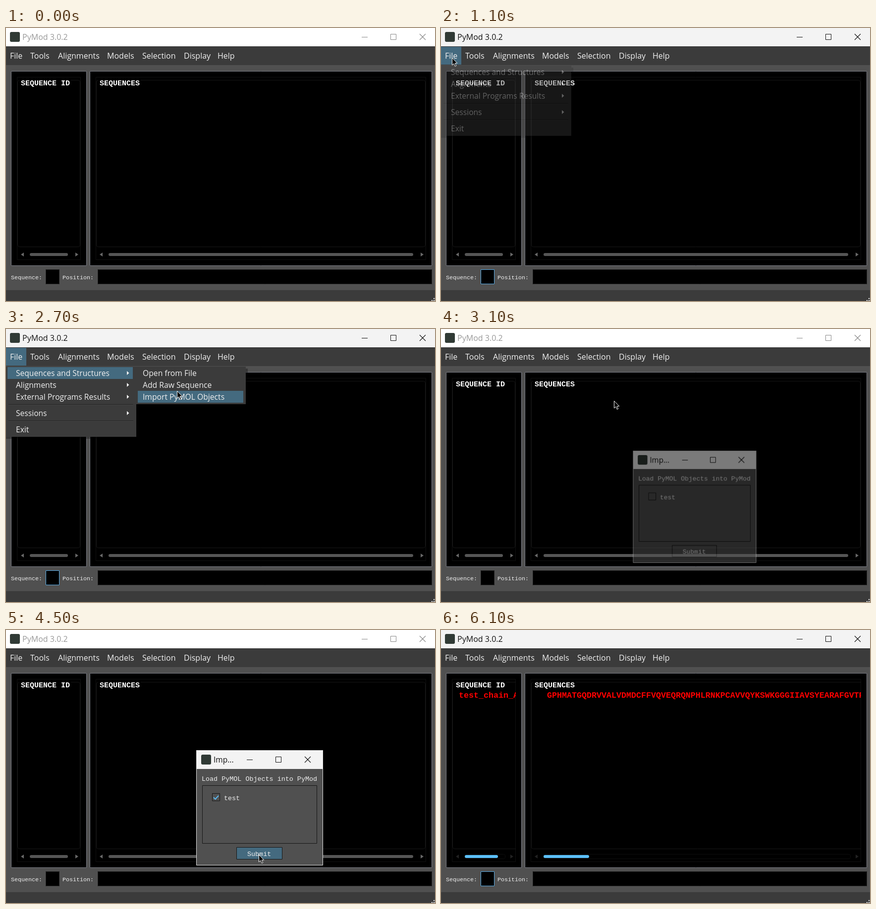
An HTML page with a canvas for the animation above (6700 ms loop, 866 by 552 pixels).

```html
<!DOCTYPE html>
<html lang="en">
<head>
<meta charset="utf-8">
<title>PyMod</title>
<style>
html, body { margin: 0; width: 100%; height: 100%; overflow: hidden; background: #505050; }
canvas { display: block; }
</style>
</head>
<body>
<canvas id="stage" width="866" height="552"></canvas>
<script>
const W = 866, H = 552, LOOP = 6700, STEP = 100;
const screen2d = document.getElementById('stage').getContext('2d');
const layer = document.createElement('canvas');
layer.width = W;
layer.height = H;
const layer2d = layer.getContext('2d');
let ctx = screen2d;

const UI = '"Open Sans", "Noto Sans", sans-serif';
const MONO = '"Liberation Mono", "Courier New", monospace';
const BG = '#505050', BAR = '#3b3b3b', TEAL = '#446a7f', BLUE = '#5cc0fa', TEXT = '#f0f0f0';

const CHAIN = 'GPHMATGQDRVVALVDMDCFFVQVEQRQNPHLRNKPCAVVQYKSWKGGGIIAVSYEARAFGVTR';

const BAR_ITEMS = [['File', 8], ['Tools', 49], ['Alignments', 105], ['Models', 204],
  ['Selection', 275], ['Display', 359], ['Help', 427]];
const FILE_ITEMS = [['Sequences and Structures', 89, true], ['Alignments', 113, true],
  ['External Programs Results', 137, true], ['Sessions', 170, true], ['Exit', 203, false]];
const SUB_ITEMS = [['Open from File', 89], ['Add Raw Sequence', 113], ['Import PyMOL Objects', 137]];

// Pointer stops: time, x, y, easing of the leg that ends there
const smooth = p => (1 - Math.cos(Math.PI * p)) / 2;
const easeOut = p => 1 - (1 - p) ** 2;
const easeIn = p => p ** 1.6;
const linear = p => p;
const PATH = [
  [100, 844, 62, linear], [700, 34, 62, easeOut], [800, 22, 60, linear],
  [1300, 22, 60, linear], [2000, 169, 83, smooth], [2700, 345, 125, smooth],
  [2900, 345, 135, easeOut], [3000, 345, 135, linear], [3700, 423, 338, smooth],
  [3800, 423, 338, linear], [4400, 510, 448, smooth], [4500, 510, 454, linear],
  [5500, 510, 454, linear], [6000, 797, 265, easeIn]
];

function pointerAt(t) {
  if (t < 100 || t > 6000) return null;
  const i = Math.max(1, PATH.findIndex(stop => stop[0] >= t));
  const [t0, x0, y0] = PATH[i - 1], [t1, x1, y1, ease] = PATH[i];
  const p = ease((t - t0) / (t1 - t0));
  return { x: Math.round(x0 + (x1 - x0) * p), y: Math.round(y0 + (y1 - y0) * p) };
}

function rect(x, y, w, h, color) {
  ctx.fillStyle = color;
  ctx.fillRect(x, y, w, h);
}

function frame(x, y, w, h, color, radius = 0) {
  ctx.strokeStyle = color;
  ctx.lineWidth = 1;
  ctx.beginPath();
  ctx.roundRect(x + 0.5, y + 0.5, w - 1, h - 1, radius);
  ctx.stroke();
}

function pill(x, y, w, h, color, radius = h / 2) {
  ctx.fillStyle = color;
  ctx.beginPath();
  ctx.roundRect(x, y, w, h, radius);
  ctx.fill();
}

function text(str, x, y, font, color) {
  ctx.font = font;
  ctx.fillStyle = color;
  ctx.fillText(str, x, y);
}

function triangle(x, y, w, h, color) {
  ctx.fillStyle = color;
  ctx.beginPath();
  ctx.moveTo(x, y - h);
  ctx.lineTo(x + w, y);
  ctx.lineTo(x, y + h);
  ctx.fill();
}

function polyline(points, color, width) {
  ctx.strokeStyle = color;
  ctx.lineWidth = width;
  ctx.beginPath();
  points.forEach(([x, y]) => ctx.lineTo(x, y));
  ctx.stroke();
}

// Draws a group on its own layer so it fades and scales as one piece
function faded(alpha, scale, cx, cy, draw) {
  layer2d.clearRect(0, 0, W, H);
  ctx = layer2d;
  draw();
  ctx = screen2d;
  ctx.save();
  ctx.globalAlpha = alpha;
  ctx.translate(cx, cy);
  ctx.scale(scale, scale);
  ctx.drawImage(layer, -cx, -cy);
  ctx.restore();
}

function windowButtons(xs, y, color) {
  const [min, max, close] = xs;
  rect(min, y, 12, 1, color);
  frame(max, y - 6, 12, 12, color);
  polyline([[close, y - 6], [close + 12, y + 6]], color, 1.1);
  polyline([[close, y + 6], [close + 12, y - 6]], color, 1.1);
}

function appIcon(x, y) {
  pill(x, y, 20, 20, '#303a35', 3);
}

function scrollBar(left, right, handleEnd, loaded) {
  const arrow = loaded ? '#222' : '#686868';
  if (loaded) frame(left + 15, 453, right - left - 28, 10, '#0e0e0e', 3);
  triangle(left + 3, 458, -6, 4, arrow);
  triangle(right - 3, 458, 6, 4, arrow);
  pill(left + 15, 455, handleEnd - left - 15, 6, loaded ? BLUE : '#555');
}

function panel(x, w, title, loaded, handleEnd, drawRow) {
  rect(x, 87, w, 394, '#000');
  frame(x, 87, w, 394, '#7d7f88');
  frame(x + 12, 99, w - 24, 370, '#111');
  ctx.save();
  ctx.beginPath();
  ctx.rect(x + 12, 99, w - 24, 370);
  ctx.clip();
  frame(x + 13, 105, loaded ? w : w - 26, 338, '#171717', 4);
  rect(x + 17, 102, title.length * 9 + 5, 14, '#000');
  text(title, x + 20, 116, `bold 15px ${MONO}`, '#fff');
  if (loaded) drawRow();
  ctx.restore();
  scrollBar(x + 23, x + w - 23 + 3, handleEnd, loaded);
}

function mainWindow(active, loaded, fileOpen) {
  rect(0, 0, W, H, BG);
  rect(0, 0, W, 37, active ? '#f3f3f3' : '#fff');
  appIcon(8, 8);
  text('PyMod 3.0.2', 33, 24, `16px ${UI}`, active ? '#111' : '#999');
  windowButtons([718, 776, 835], 18, active ? '#111' : '#888');

  rect(0, 37, W, 38, BAR);
  if (fileOpen) rect(0, 38, 41, 36, TEAL);
  for (const [label, x] of BAR_ITEMS) text(label, x, 62, `16px ${UI}`, TEXT);

  const redRow = `bold 16.67px ${MONO}`;
  panel(10, 153, 'SEQUENCE ID', loaded, loaded ? 115 : 125,
    () => text('test_chain_A', 36, 137, redRow, '#f00'));
  panel(169, 691, 'SEQUENCES', loaded, loaded ? 299 : 822,
    () => text(CHAIN, 214, 137, redRow, '#f00'));

  text('Sequence:', 10, 508, `11.67px ${MONO}`, TEXT);
  text('Position:', 114, 508, `11.67px ${MONO}`, TEXT);
  rect(80, 488, 28, 30, '#000');
  frame(80, 488, 28, 30, active ? '#5cb0ea' : '#222');
  rect(185, 488, 675, 30, '#000');
  frame(185, 488, 675, 30, '#222');

  rect(0, 530, W, 22, BAR);
  for (const [x, y] of [[863, 546], [859, 550], [863, 550]]) rect(x, y, 2, 2, '#eee');
}

function menuBox(x, w, h) {
  rect(x, 80, w + 4, h, 'rgba(0,0,0,.3)');
  rect(x, 76, w, h, BAR);
}

function fileMenu(rowLit) {
  menuBox(0, 263, 142);
  if (rowLit) rect(3, 77, 253, 24, TEAL);
  for (const y of [152, 185]) {
    rect(5, y, 252, 1, '#232323');
    rect(5, y + 1, 252, 1, '#444');
  }
  for (const [label, y, hasSub] of FILE_ITEMS) {
    text(label, 20, y + 6, `15.6px ${UI}`, TEXT);
    if (hasSub) triangle(244, y, 4.5, 4, TEXT);
  }
}

function subMenu(pointer) {
  menuBox(263, 221, 76);
  const row = pointer.x > 263 ? Math.floor((pointer.y - 77) / 24) : -1;
  if (row >= 0) rect(266, 77 + row * 24, 213, 24, TEAL);
  for (const [label, y] of SUB_ITEMS) text(label, 276, y + 6, `15.7px ${UI}`, TEXT);
}

function dialog(checked, button) {
  rect(384, 243, 256, 233, BG);
  rect(384, 243, 256, 38, '#f3f3f3');
  frame(384, 243, 256, 233, '#e4e4e4');
  appIcon(394, 252);
  text('Imp...', 419, 268, `15.5px ${UI}`, '#111');
  windowButtons([486, 544, 603], 262, '#111');

  const mono = `13.4px ${MONO}`;
  text('Load PyMOL Objects into PyMod', 395, 305, mono, TEXT);
  frame(396, 314, 232, 118, '#161616');
  frame(416, 330, 16, 16, '#161616');
  if (checked) polyline([[419, 338.5], [422.5, 342], [429, 335]], '#5cb8ee', 2);
  text('test', 440, 344, mono, TEXT);
  rect(465, 439, 93, 25, button);
  frame(465, 439, 93, 25, '#161616');
  text('Submit', 487, 457, mono, TEXT);
}

function drawPointer({ x, y }) {
  const outline = [[0, 0], [0, 14.5], [3.4, 11.5], [5.8, 17], [8.2, 16], [5.9, 10.6], [10.3, 10.6]];
  ctx.beginPath();
  outline.forEach(([dx, dy]) => ctx.lineTo(x + dx + 0.5, y + dy + 0.5));
  ctx.closePath();
  ctx.fillStyle = '#000';
  ctx.fill();
  ctx.strokeStyle = '#fff';
  ctx.lineWidth = 1;
  ctx.stroke();
}

function render(t) {
  const pointer = pointerAt(t);
  const menuOpen = t >= 1100 && t < 3100;
  const fileLit = menuOpen || (t >= 700 && t < 1100);
  mainWindow(menuOpen || t >= 5100, t >= 5300, fileLit);

  if (menuOpen) {
    const rowLit = t > 1300 && pointer.y >= 77;
    faded(t < 1200 ? 0.4 : 1, 1, 0, 0, () => fileMenu(rowLit));
    if (t >= 1900) {
      const alpha = Math.min(1, 0.2 + (t - 1900) * 0.0065);
      faded(alpha, 1, 0, 0, () => subMenu(pointer));
    }
  }

  if (t >= 3100 && t < 5200) {
    const hover = t >= 4300 && pointer.y >= 439;
    const pressed = t >= 4800 && t < 4900;
    const button = pressed ? '#34566a' : hover ? TEAL : BG;
    let alpha = 1, scale = 1;
    if (t < 3200) [alpha, scale] = [0.5, 0.973];
    else if (t < 3300) [alpha, scale] = [0.95, 0.997];
    else if (t >= 5100) [alpha, scale] = [0.4, 0.95];
    faded(alpha, scale, 511.5, 358.5, () => dialog(t >= 3800, button));
  }

  if (pointer) drawPointer(pointer);
}

function tick() {
  const t = performance.now() % LOOP;
  render(Math.floor(t / STEP) * STEP);
  requestAnimationFrame(tick);
}
tick();
</script>
</body>
</html>
```
